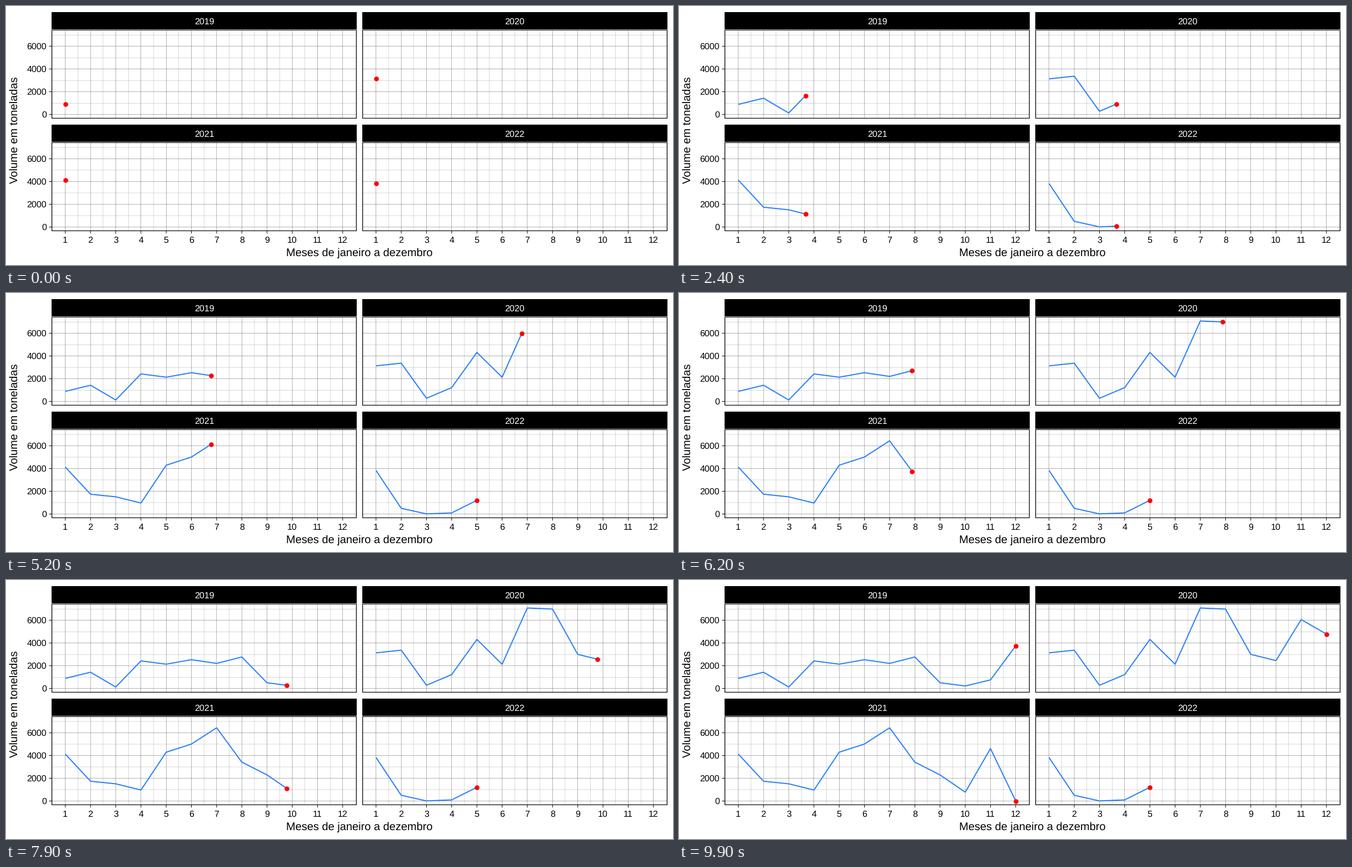
Recreate the animation shown at these times as a matplotlib script. Size 1200 by 467 pixels, loop 10000 ms.

```python
import numpy as np
import matplotlib.pyplot as plt
from matplotlib.animation import FuncAnimation
from matplotlib.patches import Rectangle

W, H, DPI = 1200, 467, 100
FRAMES, INTERVAL = 100, 100
PX = 72 / DPI                     # points per pixel

STEP_X, UNIT_Y = 45.37, 0.0205    # pixels per month, per tonne
PANEL_W, PANEL_H = 548, 159
STRIP_H = 31
BLUE, RED = "#2a80f7", "#ff0000"

VOLUMES = {
    "2019": [888, 1430, 130, 2425, 2137, 2532, 2205, 2770, 502, 220, 755, 3750],
    "2020": [3132, 3370, 283, 1220, 4317, 2132, 7083, 6985, 3000, 2454, 6063, 4785],
    "2021": [4130, 1741, 1512, 966, 4293, 5010, 6439, 3420, 2293, 776, 4615, 0],
    "2022": [3829, 502, 10, 98, 1205],
}

plt.rcParams["font.family"] = "Liberation Sans"
plt.rcParams["text.hinting"] = "none"
plt.rcParams["text.hinting_factor"] = 1

fig = plt.figure(figsize=(W / DPI, H / DPI), dpi=DPI, facecolor="white")
ax = fig.add_axes([0, 0, 1, 1])
ax.set_xlim(0, W)
ax.set_ylim(H, 0)
ax.axis("off")


def line(xs, ys, width, color="black", z=1, **kw):
    return ax.plot(xs, ys, color=color, lw=width * PX, zorder=z, snap=False,
                   solid_capstyle="butt", **kw)[0]


def label(x, y, text, size=16, color="black", ha="center", **kw):
    kw.setdefault("va", "baseline")
    ax.text(x, y, text, fontsize=size * PX, color=color, ha=ha, zorder=6, **kw)


class Panel:
    def __init__(self, year, left, top):
        self.left, self.top = left, top
        self.right, self.bottom = left + PANEL_W, top + PANEL_H
        self.values = np.array(VOLUMES[year], float)
        self.months = np.arange(1, len(self.values) + 1)
        self.draw_grid()
        self.draw_frame(year)
        self.path = line([], [], 2, BLUE, 3, solid_joinstyle="round")
        self.dot = ax.plot([], [], "o", color=RED, ms=8.6 * PX, mew=0,
                           zorder=4, snap=False)[0]

    def x(self, month):
        return self.left + 24.2 + STEP_X * (month - 1)

    def y(self, value):
        return self.top + 152.2 - UNIT_Y * value

    def draw_grid(self):
        for half in range(1, 26):
            x = self.x(half / 2)
            line([x, x], [self.top, self.bottom], 0.15 if half % 2 else 0.3)
        for k in range(8):
            y = self.y(1000 * k)
            line([self.left, self.right], [y, y], 0.15 if k % 2 else 0.3)

    def draw_frame(self, year):
        ax.add_patch(Rectangle((self.left, self.top), PANEL_W, PANEL_H, fill=False,
                               ec="black", lw=1.2 * PX, zorder=5, snap=False))
        ax.add_patch(Rectangle((self.left - 0.5, self.top - 32.4), PANEL_W + 1,
                               STRIP_H, fc="black", lw=0, zorder=5, snap=False))
        label((self.left + self.right) / 2, self.top - 10.5, year, color="white")

    def draw_y_axis(self):
        for value in range(0, 8000, 2000):
            y = self.y(value)
            line([self.left - 5, self.left], [y, y], 1)
            label(self.left - 9.7, y + 5.7, str(value), ha="right")

    def draw_x_axis(self):
        for month in range(1, 13):
            x = self.x(month)
            line([x, x], [self.bottom, self.bottom + 5], 1)
            label(x, self.bottom + 21.3, str(month))

    def reveal(self, now):
        now = min(now, self.months[-1])
        value = np.interp(now, self.months, self.values)
        past = self.months < now - 1e-9
        xs = self.x(np.append(self.months[past], now))
        ys = self.y(np.append(self.values[past], value))
        self.path.set_data(xs, ys)
        self.dot.set_data(xs[-1:], ys[-1:])
        return self.path, self.dot


corners = [(82.5, 43.4), (641.5, 43.4), (82.5, 246.3), (641.5, 246.3)]
panels = [Panel(year, *corner) for year, corner in zip(VOLUMES, corners)]
for panel in panels[::2]:
    panel.draw_y_axis()
for panel in panels[2:]:
    panel.draw_x_axis()

label(636, 451.3, "Meses de janeiro a dezembro", 20)
label(24.6, 224, "Volume em toneladas", 20, rotation=90, va="center",
      ha="right", rotation_mode="default")


def draw(frame):
    now = 1 + 11 * frame / (FRAMES - 1)
    return [artist for panel in panels for artist in panel.reveal(now)]


anim = FuncAnimation(fig, draw, frames=FRAMES, interval=INTERVAL,
                     init_func=lambda: draw(0), repeat=True, repeat_delay=0)
plt.show()
```
